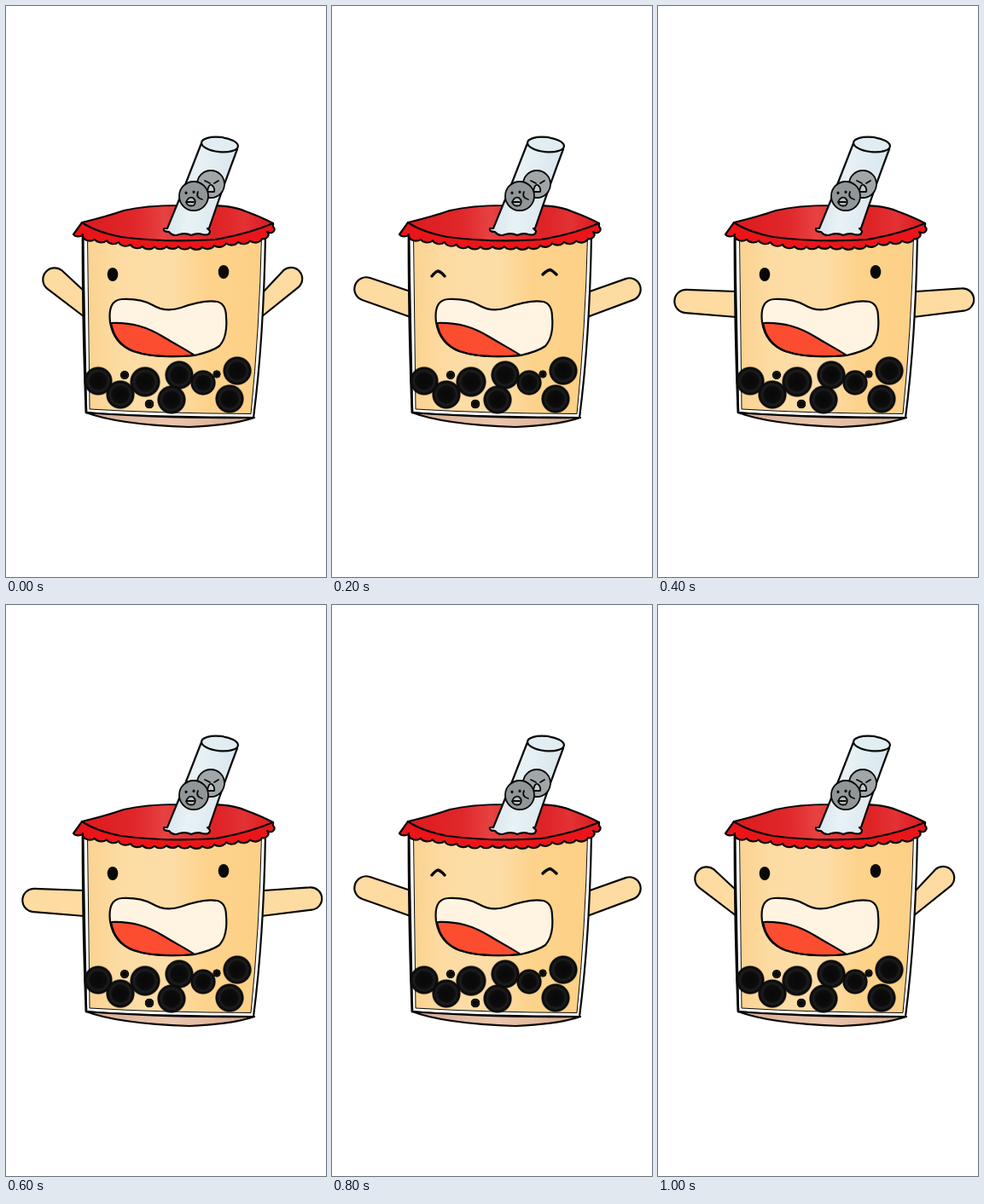
Animation, 375 px wide and 670 px high, one loop 1100 ms. Source, as an HTML page:

```html
<!DOCTYPE html>
<html lang="en">
<head>
<meta charset="utf-8">
<title>Waving bubble tea</title>
<style>
  html, body { margin: 0; width: 100%; height: 100%; overflow: hidden; background: #fff; }
  svg { display: block; width: 375px; height: 670px; }
  .ink { stroke: #080808; stroke-width: 2.2; stroke-linecap: round; stroke-linejoin: round; }
  .line { fill: none; }
  /* one short blink on the way down, one on the way up */
  .open { animation: open 1100ms step-end infinite; }
  .shut { animation: shut 1100ms step-end infinite; }
  @keyframes open {
    0%, 27.2727%, 81.8182% { visibility: visible; }
    18.1818%, 72.7273% { visibility: hidden; }
  }
  @keyframes shut {
    0%, 27.2727%, 81.8182% { visibility: hidden; }
    18.1818%, 72.7273% { visibility: visible; }
  }
</style>
</head>
<body>
<svg viewBox="0 0 375 670">
  <defs>
    <linearGradient id="tea">
      <stop offset="0" stop-color="#fbd391"/>
      <stop offset=".2" stop-color="#fddca4"/>
      <stop offset=".48" stop-color="#fddda7"/>
      <stop offset=".68" stop-color="#fdd38c"/>
      <stop offset="1" stop-color="#fdd086"/>
    </linearGradient>
    <linearGradient id="lid">
      <stop offset="0" stop-color="#dc1a1e"/>
      <stop offset=".28" stop-color="#e0272a"/>
      <stop offset=".43" stop-color="#e74142"/>
      <stop offset=".7" stop-color="#de2225"/>
      <stop offset=".85" stop-color="#e33235"/>
      <stop offset="1" stop-color="#da191c"/>
    </linearGradient>
    <linearGradient id="straw" x1="0" y1=".4" x2="1" y2=".6">
      <stop offset="0" stop-color="#d3e2ea"/>
      <stop offset=".4" stop-color="#e8f2f6"/>
      <stop offset="1" stop-color="#d6e4ec"/>
    </linearGradient>
    <linearGradient id="base">
      <stop offset="0" stop-color="#d4aa92"/>
      <stop offset=".5" stop-color="#eac6ad"/>
      <stop offset="1" stop-color="#d6a98c"/>
    </linearGradient>
    <radialGradient id="pearl">
      <stop offset="0" stop-color="#080808"/>
      <stop offset=".55" stop-color="#0c0c0c"/>
      <stop offset=".72" stop-color="#1e1e1e"/>
      <stop offset=".86" stop-color="#0b0b0b"/>
      <stop offset=".93" stop-color="#0b0b0b"/>
      <stop offset="1" stop-color="#0b0b0b" stop-opacity=".3"/>
    </radialGradient>
  </defs>

  <g class="ink" fill="#fddba1">
    <path id="left"/>
    <path id="right"/>
  </g>

  <!-- cup -->
  <path class="ink" fill="#fff"
        d="M90 266L94 477Q150 482 290 483Q302 390 304 268Z"/>
  <path class="ink" fill="url(#base)"
        d="M94 477Q130 491 215 494Q265 492 291 483Q180 484 94 477Z"/>
  <path fill="url(#tea)" d="M96 266L98 473Q180 478 287 478Q297 380 299 266Z"/>
  <path class="ink line" style="stroke-width:1"
        d="M95.5 268L98 473Q180 478 287 478.5Q297 380 299.5 270"/>
  <path class="ink line" style="stroke-width:2.8" d="M90 268Q90 380 94 477"/>

  <!-- face -->
  <g class="open" fill="#080808">
    <ellipse cx="125" cy="315" rx="6.3" ry="8"/>
    <ellipse cx="255" cy="312" rx="6.3" ry="8"/>
  </g>
  <path class="shut ink line" style="stroke-width:3.4"
        d="M117 317Q121 312 124 311Q128 312 132 317M247 315Q252 310 256 309.5Q259 311 263 315"/>
  <path id="mouth" fill="#fef4e1"
        d="M122 371Q119 345 136 344Q158 343 172 351Q187 360 205 354Q232 344 248 347Q258 350 258 365Q260 388 250 399Q242 405 221 410Q175 414 149 405Q126 396 122 371Z"/>
  <path class="ink" fill="#fd4d30"
        d="M123 372C148 371 166 377 184 388S209 402 221 410Q175 414 149 405Q127 396 123 372Z"/>
  <use href="#mouth" class="ink" fill-opacity="0"/>

  <g id="pearls" fill="url(#pearl)"/>

  <!-- lid -->
  <path class="ink" id="frill" fill="#ea1519"/>
  <path class="ink" fill="url(#lid)"
        d="M89 254Q118 247 138 240Q164 234 200 234Q258 231 281 241Q300 248 313 255Q282 268 245 274Q190 278 135 271Q105 265 89 254Z"/>

  <!-- straw -->
  <path fill="url(#straw)"
        d="M229 161Q210 211 189 261L185 261Q185 266 191 265Q196 271 203 268Q211 266 217 269Q224 266 230 268Q239 270 239 262L237 261Q251 220 271 168Z"/>
  <path class="ink line"
        d="M229 161Q210 211 189 261L185 261Q184 265 191 265Q196 271 203 268Q211 266 217 269Q224 266 230 268Q239 270 239 264L236 261M271 168Q253 216 238 261"/>
  <ellipse class="ink" cx="250.5" cy="162.5" rx="21.5" ry="8.6" fill="#e0edf2"
           transform="rotate(6 250.5 162.5)"/>

  <!-- two pearls inside the straw -->
  <g class="ink" fill="#a1a6a8" style="stroke-width:1.8">
    <circle cx="240" cy="209" r="16"/>
    <path class="line" d="M233 205L239 208M244 208L249 205"/>
    <path fill="#c5c9ca" d="M236 218Q237 209 241 210Q245 213 244 218Z"/>
    <circle cx="220" cy="223" r="17" fill="#919698"/>
    <path fill="#b9bdbe" d="M211 230Q214 223 219 225Q224 229 220 234Q213 236 211 230Z"/>
    <path class="line" d="M212 230H220M225 218Q222 225 230 227"/>
    <path class="line" style="stroke-width:3" d="M211 219v.5M220 218v.5"/>
  </g>
</svg>

<script>
  const STEP = 100;
  const byId = id => document.getElementById(id);

  // Hand centres: raised, lowering, lowest
  const hands = {
    left: [[57, 321], [43.5, 327.5], [40, 332], [36, 339.5], [33, 346.5], [32, 353]],
    right: [[334, 320], [344, 327.5], [348.5, 332.5], [353.5, 338.5], [357, 344.5], [358, 351.5]]
  };
  const shoulders = {
    left: { top: [92, 335], bottom: [92, 365], r: 13.7, sweep: 0 },
    right: { top: [302, 335], bottom: [299, 365], r: 13.2, sweep: 1 }
  };

  function armPath(side, pose) {
    const { top, bottom, r, sweep } = shoulders[side];
    const [x, y] = hands[side][pose];
    const dx = x - (top[0] + bottom[0]) / 2;
    const dy = y - (top[1] + bottom[1]) / 2;
    const k = r / Math.hypot(dx, dy) * (sweep ? 1 : -1);
    const nx = dy * k, ny = -dx * k;
    return `M${top}L${x + nx} ${y + ny}A${r} ${r} 0 0 ${sweep} ${x - nx} ${y - ny}L${bottom}`;
  }

  const pearls = [
    [108, 440, 17], [134, 456, 17], [163, 441, 18], [203, 433, 17],
    [194, 462, 17], [231, 442, 15], [271, 428, 17], [262, 461, 17],
    [139, 433, 5.3], [168, 467, 5.5], [247, 432, 4.8]
  ];
  byId("pearls").innerHTML = pearls
    .map(([x, y, r]) => `<circle cx="${x}" cy="${y}" r="${r}"/>`).join("");

  // Scalloped rim hanging below the lid
  let rim = "M89 254L79 268A6 4 0 0 0 90 268";
  for (let x = 104; x <= 300; x += 14) {
    const u = (x - 200) / 110;
    const y = 283 - 13 * u * u + Math.sin(x * 1.7);
    rim += `A8.5 6.5 0 0 0 ${x} ${y.toFixed(1)}`;
  }
  byId("frill").setAttribute("d", rim + "A6 5 0 0 0 306 265A5 4 0 0 0 313 259L313 255Z");

  const start = performance.now();
  function draw() {
    const step = Math.floor(Math.max(0, performance.now() - start) / STEP) % 11;
    const pose = 5 - Math.abs(step - 5);
    for (const side of ["left", "right"]) byId(side).setAttribute("d", armPath(side, pose));
    requestAnimationFrame(draw);
  }
  draw();
</script>
</body>
</html>
```
